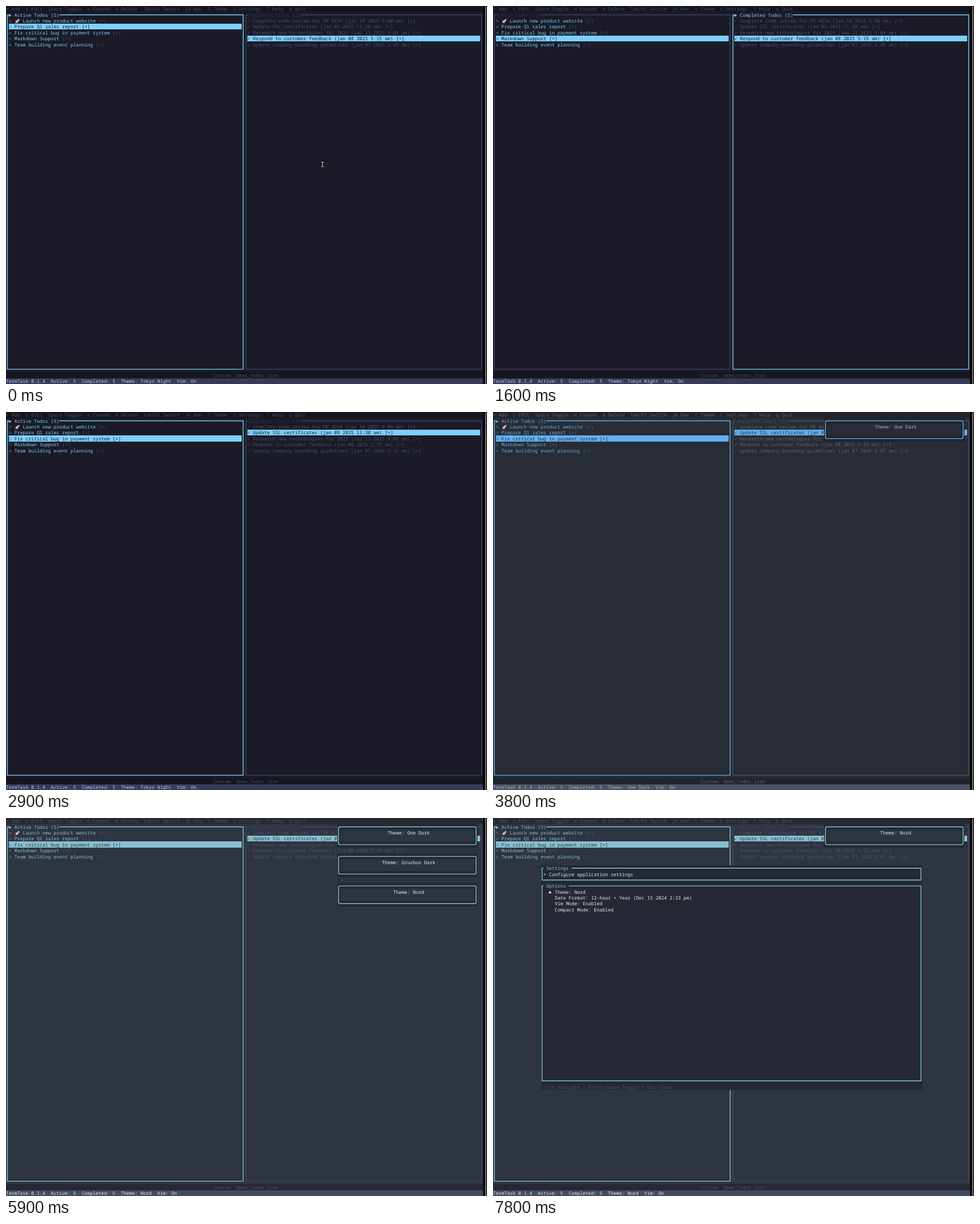
Animation, 845 px wide and 663 px high, one loop 8 s. Source, as an HTML page with a canvas:

```html
<!DOCTYPE html>
<html lang="en">
<head>
<meta charset="utf-8">
<title>Terminal todo list</title>
<style>
html, body { margin: 0; width: 100%; height: 100%; overflow: hidden; background: #000; }
canvas { display: block; }
</style>
</head>
<body>
<canvas id="stage"></canvas>
<script>
const W = 845, H = 663, LOOP = 8000;
const CW = 4.93, RH = H / 64;
const canvas = document.getElementById('stage');
const ratio = window.devicePixelRatio || 1;
canvas.width = W * ratio;
canvas.height = H * ratio;
canvas.style.width = W + 'px';
canvas.style.height = H + 'px';
const ctx = canvas.getContext('2d');

const themes = [
  { name: 'Tokyo Night', bg: '#1a1b26', dark: '#15161e', accent: '#7dcfff', bar: '#363c58', text: '#c0caf5', dim: '#484e6b', faint: '#2c3046', line: '#3b4261' },
  { name: 'One Dark', bg: '#282c34', dark: '#21252b', accent: '#61afef', bar: '#4b5263', text: '#abb2bf', dim: '#5c6370', faint: '#484e5a', line: '#4b5263' },
  { name: 'Gruvbox Dark', bg: '#282828', dark: '#1d2021', accent: '#83a598', bar: '#665c54', text: '#ebdbb2', dim: '#7c6f64', faint: '#5a524b', line: '#665c54' },
  { name: 'Nord', bg: '#2e3440', dark: '#242933', accent: '#88c0d0', bar: '#434c5e', text: '#e5e9f0', dim: '#4c566a', faint: '#3f485a', line: '#434c5e' }
];

const todos = [
  'Launch new product website',
  'Prepare Q1 sales report',
  'Fix critical bug in payment system',
  'Markdown Support',
  'Team building event planning'
];
const done = [
  'Complete code review for PR #234 (jan 10 2025 8:00 am)',
  'Update SSL certificates (jan 09 2025 11:30 am)',
  'Research new technologies for 2025 (sep 11 2025 9:09 am)',
  'Respond to customer feedback (jan 08 2025 5:15 am)',
  'Update company branding guidelines (jan 07 2025 3:45 am)'
];
const menu = '+ Add  r Edit  Space Toggle  e Expand  d Delete  Tab/hl Switch  jk Nav  t Theme  s Settings  ? Help  q Quit';

// Each step overrides part of the state from its time on.
const steps = [
  [0, { left: 1, right: 3, focus: 0, theme: 0, pointer: true, toasts: [], dialog: false }],
  [500, { left: 2, pointer: false }],
  [700, { left: 3 }],
  [900, { left: 4 }],
  [1200, { left: 3 }],
  [1600, { focus: 1 }],
  [2000, { right: 2 }],
  [2200, { right: 1 }],
  [2500, { focus: 0 }],
  [2900, { left: 2 }],
  [3800, { theme: 1, toasts: [1] }],
  [4600, { theme: 2, toasts: [1, 2] }],
  [5900, { theme: 3, toasts: [1, 2, 3] }],
  [7000, { toasts: [2, 3] }],
  [7200, { dialog: true }],
  [7800, { toasts: [3] }]
];

function stateAt(t) {
  const s = {};
  for (const [time, change] of steps) if (t >= time) Object.assign(s, change);
  return s;
}

function cells(col, row, cols, rows, color) {
  const x = Math.round(col * CW), y = Math.round(row * RH);
  ctx.fillStyle = color;
  ctx.fillRect(x, y, Math.round((col + cols) * CW) - x, Math.round((row + rows) * RH) - y);
}

function put(str, col, row, color) {
  ctx.fillStyle = color;
  ctx.fillText(str, col * CW, row * RH + 8.4);
}

const midX = col => (col + 0.5) * CW;
const midY = row => (row + 0.5) * RH;

// A box through cell centres; the top edge is open between two columns for a title.
function box(c1, r1, c2, r2, color, from, to) {
  const x1 = midX(c1), x2 = midX(c2), y1 = midY(r1), y2 = midY(r2);
  ctx.strokeStyle = color;
  ctx.lineWidth = 1.4;
  ctx.beginPath();
  ctx.moveTo(to * CW, y1);
  ctx.lineTo(x2, y1);
  ctx.lineTo(x2, y2);
  ctx.lineTo(x1, y2);
  ctx.lineTo(x1, y1);
  ctx.lineTo(from * CW, y1);
  ctx.stroke();
}

function shape(color, points) {
  ctx.fillStyle = color;
  ctx.beginPath();
  points.forEach(([x, y]) => ctx.lineTo(x, y));
  ctx.fill();
}

function rocket(x, y) {
  ctx.save();
  ctx.translate(x, y);
  ctx.rotate(Math.PI / 4);
  shape('#ffb02e', [[-1.1, 2.5], [1.1, 2.5], [0, 5.6]]);
  shape('#e0453a', [[-1.3, -0.2], [-2.9, 1.8], [-2.7, 3.8], [0, 2.2], [2.7, 3.8], [2.9, 1.8], [1.3, -0.2]]);
  ctx.fillStyle = '#c9d3da';
  ctx.beginPath();
  ctx.ellipse(0, -0.8, 1.7, 4.1, 0, 0, Math.PI * 2);
  ctx.fill();
  shape('#e0453a', [[-1.1, -3.7], [0, -5.4], [1.1, -3.7]]);
  ctx.fillStyle = '#3c7fae';
  ctx.beginPath();
  ctx.arc(0, -1.5, 0.9, 0, Math.PI * 2);
  ctx.fill();
  ctx.restore();
}

function pane(col, title, focused, th) {
  const label = (focused ? '► ' : '') + title;
  box(col, 1, col + 84, 61, focused ? th.accent : th.line, col + 1, col + 1 + label.length);
  put(label, col + 1, 1, focused ? th.accent : th.faint);
}

function list(col, items, mark, picked, color, th) {
  items.forEach((item, i) => {
    const row = i + 2, on = i === picked;
    if (on) cells(col, row, 83, 1, th.accent);
    const main = on ? th.bg : color;
    const hasIcon = mark === '○' && i === 0;
    const start = col + (hasIcon ? 5 : 2);
    put(mark, col, row, main);
    if (hasIcon) rocket(20, midY(row) + 0.6);
    put(item, start, row, main);
    put('[+]', start + item.length + 1, row, on ? th.bg : th.dim);
  });
}

function toast(slot, name, th) {
  const row = 1 + slot * 5, label = 'Theme: ' + name;
  cells(118, row, 50, 4, th.dark);
  cells(119, row + 1, 48, 2, th.bg);
  ctx.strokeStyle = th.accent;
  ctx.lineWidth = 1.4;
  ctx.beginPath();
  ctx.roundRect(midX(118), midY(row), 49 * CW, 3 * RH, 2.4);
  ctx.stroke();
  put(label, 119 + Math.round((48 - label.length) / 2), row + 1, th.text);
}

function dialog(th) {
  cells(17, 8, 136, 38, th.dark);
  box(17, 8, 152, 10, th.accent, 18, 28);
  put('Settings', 19, 8, th.accent);
  put('> Configure application settings', 18, 9, th.text);
  box(17, 11, 152, 44, th.accent, 18, 27);
  put('Options', 19, 11, th.accent);
  put('►', 20, 12, th.text);
  [
    'Theme: ' + th.name,
    'Date Format: 12-hour + Year (Dec 15 2024 2:33 pm)',
    'Vim Mode: Enabled',
    'Compact Mode: Enabled'
  ].forEach((line, i) => put(line, 22, 12 + i, th.text));
  put('↑↓/jk Navigate | Enter/Space Toggle | Esc Close', 17, 45, th.dim);
}

function pointer() {
  const beam = (color, width) => {
    ctx.strokeStyle = color;
    ctx.lineWidth = width;
    ctx.beginPath();
    ctx.moveTo(553.8, 274);
    ctx.lineTo(558.2, 274);
    ctx.moveTo(553.8, 282);
    ctx.lineTo(558.2, 282);
    ctx.moveTo(556, 274);
    ctx.lineTo(556, 282);
    ctx.stroke();
  };
  beam('#000', 2.4);
  beam('#e8e8e8', 1.1);
}

function draw(t) {
  const s = stateAt(t), th = themes[s.theme];
  ctx.setTransform(ratio, 0, 0, ratio, 0, 0);
  ctx.font = `${CW / 0.6}px "Noto Sans Mono", "DejaVu Sans Mono", monospace`;
  ctx.textRendering = 'geometricPrecision';
  ctx.textBaseline = 'alphabetic';

  ctx.fillStyle = '#050507';
  ctx.fillRect(0, 0, W, H);
  ctx.fillStyle = '#77777b';
  ctx.fillRect(841.6, 1, 2.2, H - 1);

  cells(0, 0, 170, 64, th.bg);
  cells(0, 0, 170, 1, th.dark);
  put(menu, 0, 0, th.dim);

  pane(0, 'Active Todos (5)', s.focus === 0, th);
  pane(85, 'Completed Todos (5)', s.focus === 1, th);
  list(1, todos, '○', s.left, th.accent, th);
  list(86, done, '✓', s.right, th.dim, th);

  cells(0, 62, 170, 1, th.dark);
  put('Custom: demo_todos.json', 74, 62, th.dim);
  cells(0, 63, 170, 1, th.bar);
  put(`TermTask 0.1.4  Active: 5  Completed: 5  Theme: ${th.name}  Vim: On`, 0, 63, th.text);

  if (s.dialog) dialog(th);
  s.toasts.forEach((id, slot) => toast(slot, themes[id].name, th));
  if (s.pointer) pointer();
}

const begin = performance.now();
function tick() {
  draw((performance.now() - begin) % LOOP);
  requestAnimationFrame(tick);
}
tick();
</script>
</body>
</html>
```
